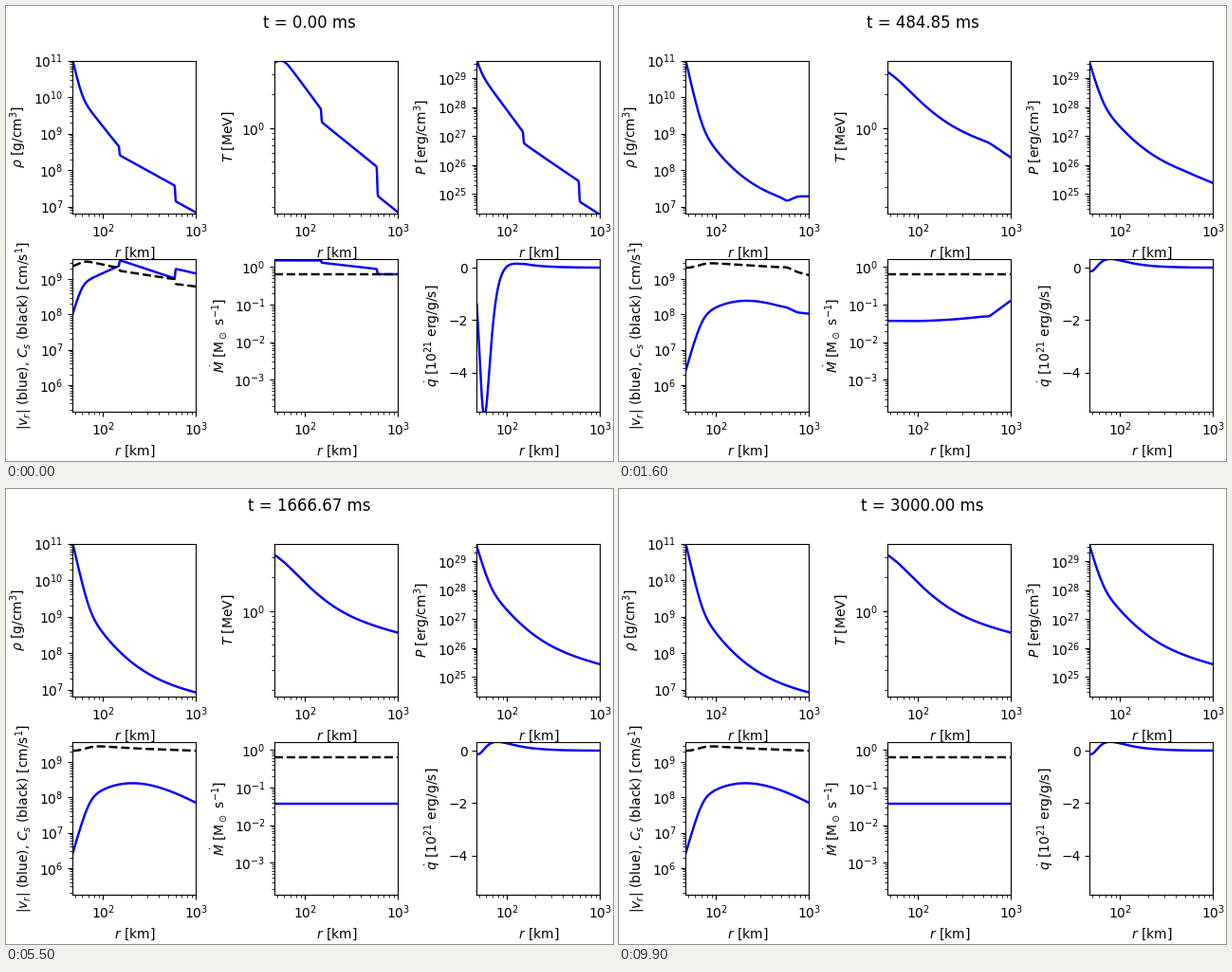
A matplotlib script that plays this animation: 640 px wide and 480 px high, repeating every 10000 ms.

```python
import numpy as np
import matplotlib.pyplot as plt
from matplotlib.animation import FuncAnimation
from matplotlib.ticker import NullFormatter

FRAMES, INTERVAL, T_END = 100, 100, 3000.0
T_WIND = T_END * 9 / (FRAMES - 1)    # ms, the shock has left and a wind sets in
R_MIN, R_MAX = 47.5, 1000.0          # km
M_SUN = 1.99e33                      # g
LW = 1.75

plt.rcParams["font.family"] = "DejaVu Sans"
s = np.linspace(0, np.log10(R_MAX / R_MIN), 600)
r = R_MIN * 10 ** s


def law(start, slope, *bends):
    """Log of a power law; each bend (position, width, change) alters its slope."""
    y = start + slope * s
    for at, width, change in bends:
        y = y + change * width * (np.logaddexp(0, (s - at) / width)
                                  - np.logaddexp(0, -at / width))
    return y


def step(at, height):
    return height / (1 + np.exp(-np.clip((s - at) / 0.002, -60, 60)))


def infall(shell):
    """Logs of density, temperature and mass flow before the shock passes."""
    rho = law(11, -10.8, (0.1, 0.03, 7.6), (0.5, 0.01, 1.8))
    temp = law(0.585, 0.6, (0.08, 0.03, -1.72), (0.5, 0.01, 0.45))
    flow = law(0.175, 0, (0.5, 0.01, -0.28), (shell, 0.01, 0.28))
    return (rho + step(0.5, -0.22) + step(shell, -0.42),
            temp + step(0.5, -0.11) + step(shell, -0.255),
            flow + step(0.5, -0.06) + step(shell, -0.14))


def wind(t):
    """The same three logs behind the shock: settling wind and departing shell."""
    age = t - T_WIND
    w = 1 - np.exp(-age / (55 * (1 + 0.8 * s)))
    c = np.log10((377 + 0.965 * age) / R_MIN)
    g = min(age / 485, 1)

    rho = ((1 - w) * law(11, -13.2, (0.18, 0.04, 8), (0.14, 0.29, 4.8))
           + w * law(11, -12.15, (0.18, 0.04, 6.95), (0.42, 0.32, 4.8)))
    rho += law(0, 0, (c - 0.08, 0.01, -1.5 * g), (c, 0.01, 0.5 + 5 * g),
               (c + 0.11, 0.02, -1.5))

    temp = ((1 - w) * law(0.5, -0.5, (0.1, 0.05, -0.05))
            + w * law(0.5, -0.6, (0.1, 0.05, -0.4), (0.58, 0.22, 0.8)))
    temp += law(0, 0, (c, 0.015, -0.28))

    flow = ((1 - w) * law(-1.82, 0, (0.1, 0.02, -0.6), (0.22, 0.03, 2.3),
                          (c + 0.06, 0.03, -1.2), (c + 0.18, 0.01, -1.3))
            + w * -1.425)
    flow += law(0, 0, (c - 0.07, 0.01, -0.8 * g), (c, 0.01, 4.5 * g))
    return rho, temp, flow


def flow_state(t):
    """Density, temperature in MeV and mass flow in solar masses per second."""
    if t == 0:
        return [10 ** y for y in infall(1.1)]
    if t >= T_WIND:
        return [10 ** y for y in wind(t)]
    fade = np.exp(-t / 40)
    ahead, behind = infall(max(1.1 - t / 120, 0.5)), wind(T_WIND)
    shocked = s < 0.5 + 0.83 * t / 200
    rho, temp = (10 ** np.where(shocked, a * fade + b * (1 - fade), a)
                 for a, b in zip(ahead[:2], behind[:2]))
    inward, outward = 10 ** ahead[2], 10 ** behind[2]
    flow = np.where(shocked, np.abs(outward - inward * fade), inward)
    return rho, temp, np.maximum(flow, 1e-6)


def profiles(t):
    rho, temp, flow = flow_state(t)
    speed = flow * M_SUN / (4 * np.pi * (r * 1e5) ** 2 * rho)
    # Gas, radiation with pairs, and degenerate electrons.
    y_e = 0.5 / (1 + rho / 1e10)
    pres = 9.6e17 * rho * temp + 1.26e26 * temp ** 4 + 1.2e15 * (y_e * rho) ** (4 / 3)
    sound = np.sqrt(1.4 * pres / rho)
    # Neutrino heating minus cooling, damped where the matter is opaque.
    heat = (0.56 * (79 / r) ** 2 - 0.002 * temp ** 6) * np.exp(-rho / 8e10)
    return rho, temp, pres, speed, flow, heat, sound


fig, axes = plt.subplots(2, 3, figsize=(6.4, 4.8), dpi=100)
fig.subplots_adjust(left=0.11, right=0.9786, bottom=52 / 480, top=0.88,
                    wspace=0.64, hspace=0.298)
title = fig.suptitle("", y=0.982)

# Label and vertical range; ranges are powers of ten except for the last.
panels = [
    (r"$\rho$ [g/cm$^3$]", 6.815, 11),
    (r"$T$ [MeV]", -0.76, 0.602),
    (r"$P$ [erg/cm$^3$]", 24.33, 29.6),
    (r"$|v_r|$ (blue), $C_s$ (black) [cm/s$^1$]", 5.24, 9.58),
    (r"$\dot{M}$ [M$_\odot$ s$^{-1}$]", -3.853, 0.215),
    (r"$\dot{q}$ [10$^{21}$ erg/g/s]", -5.5, 0.335),
]
lines = []
for ax, (label, lo, hi) in zip(axes.flat, panels):
    ax.set_xscale("log")
    ax.set_xlim(R_MIN, R_MAX)
    ax.xaxis.set_minor_formatter(NullFormatter())
    if ax is axes[1, 2]:
        ax.set_ylim(lo, hi)
    else:
        ax.set_yscale("log")
        ax.set_ylim(10 ** lo, 10 ** hi)
        ax.yaxis.set_minor_formatter(NullFormatter())
    ax.set_xlabel(r"$r$ [km]")
    ax.set_ylabel(label)
    lines += ax.plot(r, np.ones_like(r), "b", lw=LW)

lines += axes[1, 0].plot(r, np.ones_like(r), "k--", lw=LW)
axes[1, 1].plot(r, np.full_like(r, 0.63), "k--", lw=LW)


def update(i):
    t = T_END * i / (FRAMES - 1)
    title.set_text(f"t = {t:.2f} ms")
    for line, values in zip(lines, profiles(t)):
        line.set_ydata(values)
    return [title, *lines]


anim = FuncAnimation(fig, update, frames=FRAMES, interval=INTERVAL,
                     repeat=True, repeat_delay=0, blit=False)
plt.show()
```
